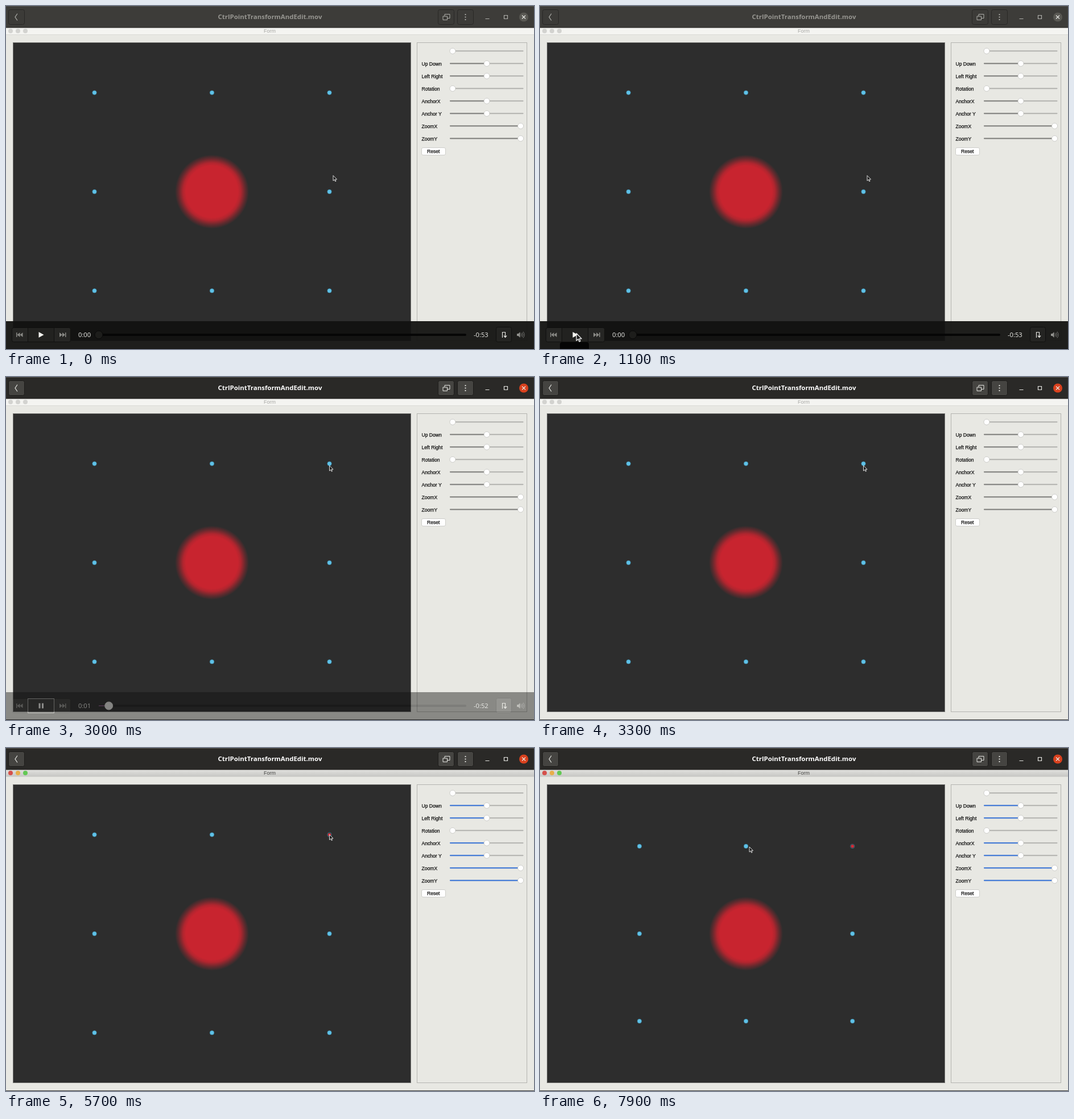
Animation, 928 px wide and 604 px high, one loop 8000 ms. Source, as an HTML page:

```html
<!DOCTYPE html>
<html lang="en">
<head>
<meta charset="utf-8">
<title>Control points</title>
<style>
html, body { margin: 0; width: 100%; height: 100%; overflow: hidden; background: #e8e8e3; }
svg { display: block; width: 928px; height: 604px; }
.ui { font: 8.6px "Liberation Sans", Arial, sans-serif; fill: #111; stroke: #111; stroke-width: .25px; }
.form { font: 9px "Liberation Sans", Arial, sans-serif; text-anchor: middle; }
.title { font: 700 11.45px "Open Sans", "Noto Sans", sans-serif; text-anchor: middle; }
.time { font: 11.2px "Open Sans", "Noto Sans", sans-serif; fill: #eeeeea; }
.line { fill: none; stroke: #e6e6e2; stroke-width: 1.2; }
</style>
</head>
<body>
<svg viewBox="0 0 928 604">
  <defs>
    <radialGradient id="glow">
      <stop offset=".7" stop-color="#c8242f"/>
      <stop offset=".78" stop-color="#c8242f" stop-opacity=".85"/>
      <stop offset=".9" stop-color="#c8242f" stop-opacity=".35"/>
      <stop offset="1" stop-color="#c8242f" stop-opacity="0"/>
    </radialGradient>
    <linearGradient id="chrome" x2="0" y2="1">
      <stop stop-color="#e2e2df"/><stop offset="1" stop-color="#c6c6c3"/>
    </linearGradient>
    <path id="arrow" d="M0 0V9.2L2.2 7.2 3.6 10.4 5 9.8 3.6 6.7H6.5Z"
      fill="#1c1c1c" stroke="#f2f2f2" stroke-width=".9" stroke-linejoin="round"/>
  </defs>

  <rect width="928" height="604" fill="#e8e8e3"/>
  <rect id="strip" y="38" width="928" height="12.5"/>
  <path d="M0 50.5H928" stroke="#d2d2ce" stroke-width=".7"/>
  <g id="lights"></g>
  <text id="form" class="form" x="463.5" y="47">Form</text>

  <rect x="12.5" y="64.5" width="699" height="525" fill="#2d2d2d" stroke="#777775"/>
  <circle cx="362" cy="327" r="65" fill="url(#glow)"/>
  <g id="points"></g>

  <rect x="722.5" y="64.5" width="193" height="525" fill="none" stroke="#b4b4b0"/>
  <g id="sliders"></g>
  <rect x="730.5" y="249.5" width="42" height="13" rx="2.5" fill="#fff" stroke="#c4c4c1" stroke-width=".8"/>
  <text class="ui" x="740" y="259">Reset</text>
  <use id="pointer" href="#arrow"/>
  <rect y="603" width="928" height="1" fill="#3a3a38"/>

  <g id="header">
    <rect id="head" width="928" height="38"/>
    <rect width="928" height="1" fill="#53524e"/>
    <rect y="37.5" width="928" height="1" fill="#1e1d1b"/>
    <g id="headButtons"></g>
    <g id="headIcons" class="line">
      <path d="M20 13.5 16 19.5 20 25.5"/>
      <path d="M771 18V14.5H780V21.5H776M768 18H775.500V24.500H768Z" stroke-width="1"/>
      <path d="M807.500 14v2M807.500 18.500v2M807.500 23v2" stroke-width="1.800"/>
      <path d="M842.500 22.500H849.500M875.500 16.500H881.500V22.500H875.500Z"/>
    </g>
    <circle id="close" cx="910" cy="19.5" r="8"/>
    <path class="line" d="M907 16.500 913 22.500M913 16.500 907 22.500" stroke-width="1.500"/>
    <text id="title" class="title" x="464" y="23.3">CtrlPointTransformAndEdit.mov</text>
  </g>

  <g id="bar">
    <rect y="555" width="928" height="49" fill="#121210" fill-opacity=".94"/>
    <rect x="10.500" y="566.500" width="103" height="25" rx="3" fill="#262624" stroke="#10100f"/>
    <rect id="mainButton" x="38.500" y="566.500" width="46" height="25"/>
    <g fill="#898985">
      <path d="M18 575h1.500v8H18ZM24.500 575v8L19.500 579ZM29.500 575v8L24.500 579Z"/>
      <path d="M105.500 575H104v8h1.500ZM99 575v8L104 579ZM94 575v8L99 579Z"/>
    </g>
    <path id="playIcon" fill="#f4f4f0"/>
    <text id="passed" class="time" x="127" y="583"></text>
    <rect x="163" y="577" width="646" height="4" rx="2" fill="#060606"/>
    <rect id="progress" x="163" y="578" height="2" fill="#643b60"/>
    <circle id="knob" cy="579" r="7"/>
    <text id="left" class="time" x="822" y="583"></text>
    <rect id="repeat" x="861.500" y="565.500" width="27" height="26" rx="3" stroke="#10100f"/>
    <path class="line" d="M872.500 584V574.500H877.500V583M875 580.500 877.500 583.500 880 580.500"/>
    <path d="M898 577H900.500L903.500 574V584L900.500 581H898Z" fill="#92928e"/>
    <path d="M905 576.500q2 2.500 0 5M907 575q3 4 0 8M909 573.500q4 5.500 0 11" fill="none" stroke="#777774"/>
  </g>
  <rect id="tip" x="35" y="592" width="51" height="20" rx="4" fill="#050505"/>
  <use id="mouse" href="#arrow"/>
</svg>
<script>
const LOOP = 8000, STEP = 100;
const CX = 362, CY = 327;
const $ = id => document.getElementById(id);

function set(el, attrs) {
  for (const k in attrs) el.setAttribute(k, attrs[k]);
  return el;
}
function add(parent, tag, attrs) {
  const el = document.createElementNS("http://www.w3.org/2000/svg", tag);
  parent.appendChild(set(el, attrs));
  return el;
}

// Keys are [time, ...values]; values ease between neighbouring keys.
function track(keys, t) {
  const n = keys.findIndex(k => k[0] > t);
  if (n === 0) return keys[0].slice(1);
  if (n < 0) return keys[keys.length - 1].slice(1);
  const a = keys[n - 1], b = keys[n];
  const u = (t - a[0]) / (b[0] - a[0]), e = u * u * (3 - 2 * u);
  return a.slice(1).map((v, i) => v + (b[i + 1] - v) * e);
}

const lights = [8, 21, 34].map(x => add($("lights"), "circle", { cx: x, cy: 44, r: 4 }));
const lightColors = ["#d5504b", "#e8ae4a", "#63c854"];

const points = [];
for (const j of [-1, 0, 1]) for (const i of [-1, 0, 1]) {
  if (!i && !j) continue;
  const ring = add($("points"), "circle", { r: 3.7, stroke: "#3f87a4", "stroke-width": .7 });
  points.push({ i, j, ring });
}
const redDot = add($("points"), "circle", { r: 2.7, fill: "#d32b37" });
const corner = points.find(p => p.i === 1 && p.j === -1);

const rows = [["", 785], ["Up Down", 845], ["Left Right", 845], ["Rotation", 785],
  ["AnchorX", 845], ["Anchor Y", 845], ["ZoomX", 904.5], ["ZoomY", 904.5]];
const fills = rows.map(([name, x], n) => {
  const g = $("sliders"), y = 79.3 + n * 22;
  add(g, "text", { class: "ui", x: 730.5, y: y + 3.4 }).textContent = name;
  add(g, "rect", { x: 780, y: y - 1, width: 129.5, height: 2, rx: 1, fill: "#b2b2af" });
  const fill = add(g, "rect", { x: 780, y: y - 1, width: x - 780, height: 2, rx: 1 });
  add(g, "circle", { cx: x, cy: y, r: 5, fill: "#fff", stroke: "#bdbdba", "stroke-width": .7 });
  return fill;
});

const headButtons = [4.5, 759.5, 793.5].map(x =>
  add($("headButtons"), "rect", { x, y: 6.5, width: 28, height: 26, rx: 3 }));

const pointerKeys = [
  [1500, 575, 298.5], [1700, 618, 354], [2000, 753, 318], [2400, 580, 165],
  [2600, 568, 152], [3000, 568.5, 156], [3900, 568.5, 156], [4000, 569, 157.5],
  [4200, 569, 170], [4800, 569, 170], [5600, 568.5, 152.5]
];
const sizeKeys = [[5800, 206.5, 174.4], [6700, 188.5, 156], [7200, 187.2, 154]];
const leaveKeys = [[7300, 549, 173], [7900, 368, 174]];
const barKeys = [[0, 1], [200, 0], [700, 0], [1000, 1], [2750, 1], [3230, 0]];

function move(el, [x, y], scale = 1) {
  set(el, { transform: `translate(${x} ${y}) scale(${scale})` });
}
const show = (el, on) => set(el, { visibility: on ? "visible" : "hidden" });

function drawForm(t) {
  const active = t >= 3500, picked = t >= 5300;
  set($("strip"), { fill: active ? "url(#chrome)" : "#f4f4f1" });
  set($("form"), { fill: active ? "#464644" : "#a9a9a6" });
  lights.forEach((l, n) => set(l, { fill: active ? lightColors[n] : "#d3d3d0" }));
  fills.forEach(f => set(f, { fill: active ? "#3c78dc" : "#858582" }));

  const [w, h] = track(sizeKeys, t);
  for (const { i, j, ring } of points) set(ring, { cx: CX + i * w, cy: CY + j * h, fill: "#5fc2e8" });
  if (picked) set(corner.ring, { fill: "#2d2d2d" });
  set(redDot, { cx: CX + w, cy: CY - h });
  show(redDot, picked);

  const at = t < 5800 ? track(pointerKeys, t)
    : t < 7300 ? [CX + w, CY - h] : track(leaveKeys, t);
  move($("pointer"), at);
}

function drawPlayer(t) {
  const focus = t >= 1400, playing = t >= 1500;
  set($("head"), { fill: focus ? "#2a2927" : "#3d3c39" });
  headButtons.forEach(b => set(b, focus
    ? { fill: "#454441", stroke: "#1d1c1a" } : { fill: "#3c3b38", stroke: "#292826" }));
  set($("headIcons"), { opacity: focus ? 1 : .68 });
  set($("title"), { fill: focus ? "#fff" : "#979691" });
  set($("close"), { fill: focus ? "#d9411e" : "#595853" });

  const sec = Math.max(0, t - 1550) / 1000, x = 163 + sec * 12.2;
  const whole = Math.floor(sec);
  $("passed").textContent = "0:0" + whole;
  $("left").textContent = "-0:" + (53 - whole);
  set($("progress"), { width: x - 163 });
  set($("knob"), { cx: x, fill: focus ? "#e7e6e1" : "#1d1d1b", stroke: focus ? "#d2d1cc" : "#090909" });
  set($("mainButton"), {
    fill: focus && t < 2400 ? "#3c3c3a" : "#222220",
    stroke: focus ? "#a6a6a2" : "#10100f"
  });
  set($("playIcon"), { d: playing
    ? "M57.5 574.500h3v9h-3ZM63 574.500h3v9h-3Z" : "M57.500 574 66.500 579 57.500 584Z" });
  set($("repeat"), { fill: focus ? "#3a3a37" : "#242422" });
  set($("bar"), { opacity: track(barKeys, t)[0] });

  show($("tip"), t >= 700 && t < 1400);
  show($("mouse"), t >= 700 && t < 2400);
  move($("mouse"), track([[700, 66.5, 576], [1500, 61.5, 577]], t), 1.4);
}

function frame(now) {
  const t = Math.floor((now % LOOP) / STEP) * STEP;
  drawForm(t);
  drawPlayer(t);
  requestAnimationFrame(frame);
}
frame(0);
</script>
</body>
</html>
```
